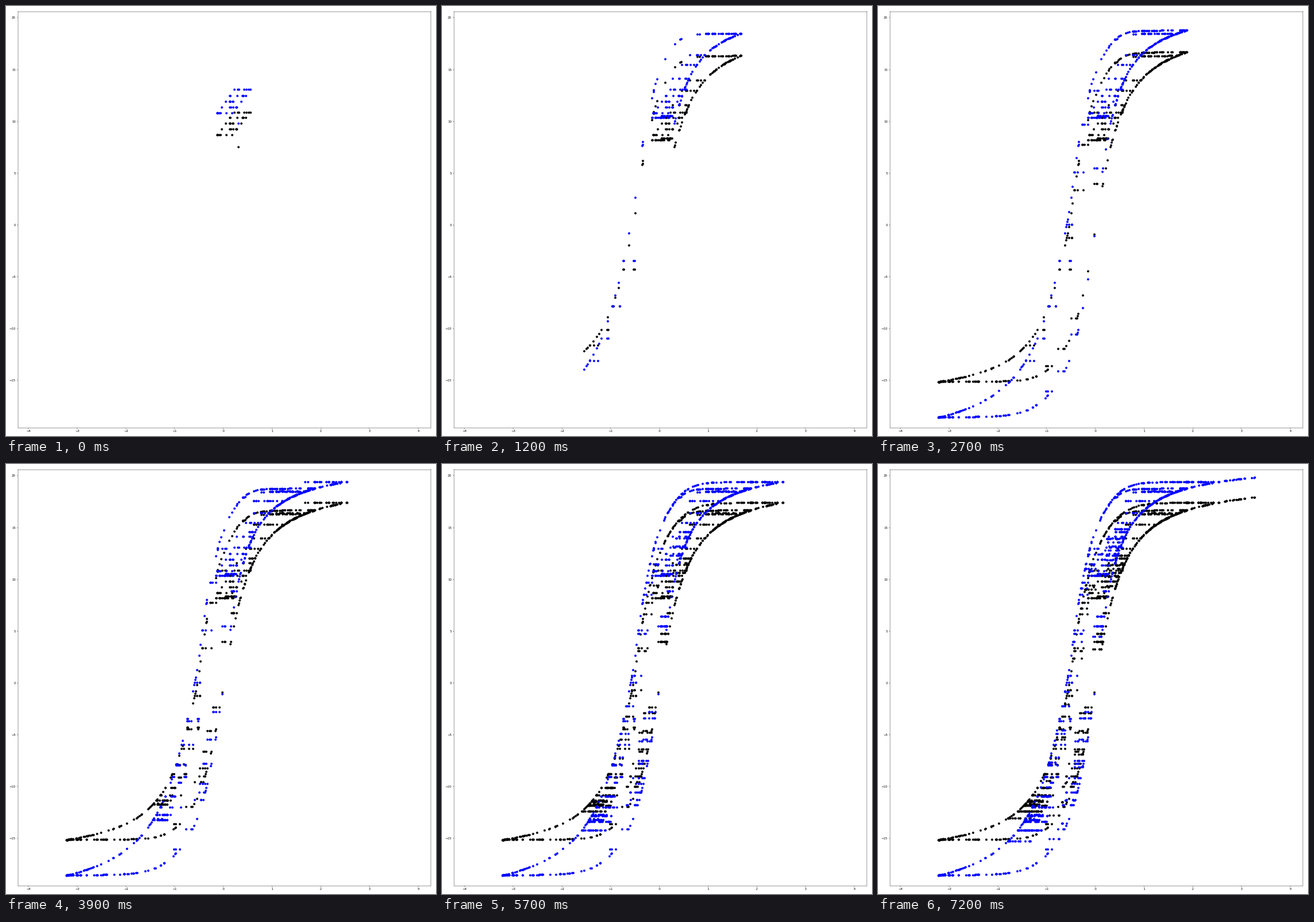
Animation, 748 px wide and 748 px high, one loop 7500 ms. Source, as a matplotlib script:

```python
import numpy as np
import matplotlib.pyplot as plt
from matplotlib.animation import FuncAnimation

FRAMES, STEP = 25, 300
SIZE = 748
rng = np.random.default_rng(7)

# Arctan branches as (x0, y0, left gain, left width, right gain, right width),
# first for the black dots, then for the blue ones.
BRANCH = {
    "up": [(0, 0, 11.8, .4, 12.5, .45), (0, 0, 13.9, .4, 13.55, .35)],
    "down": [(-.54, -.15, 10.8, .5, 13.6, .4), (-.54, 1.3, 14.7, .6, 14.2, .39)],
}
OTHER = {"up": "down", "down": "up"}
chunks = [[] for _ in range(FRAMES)]


def branch(name, x):
    """Black and blue heights on one side of the loop."""
    x = np.asarray(x, float)
    return np.array([
        y0 + np.where(x < x0, a * np.arctan((x - x0) / wa), b * np.arctan((x - x0) / wb))
        for x0, y0, a, wa, b, wb in BRANCH[name]])


def add(t, x, y):
    chunks[t].append(np.vstack([x, np.broadcast_to(y, (2, len(x)))]))


def sweep(t, name, x0, x1, n, power=1, turn=None):
    """Run along a branch, leaving the level held since the last turn."""
    u = np.r_[0, 1, rng.random(n - 2)] ** power
    x = x0 + (x1 - x0) * u
    y = branch(name, x)
    if turn is not None:
        sign = 1 if name == "up" else -1
        hold = branch(OTHER[name], turn)[:, None]
        y = sign * np.logaddexp(2 * sign * y, 2 * sign * hold) / 2
    add(t, x, y)


def terrace(t, name, x0, x1, width, rows, n):
    """Minor loops: flat rows that run inward from a branch."""
    side = -width if name == "up" else width
    for x in np.linspace(x0, x1, rows):
        xs = x + side * np.r_[0, rng.random(n - 1)]
        add(t, xs, branch(name, x)[:, None])


def ladder(t, first, last, rows, n):
    """Flat rows between two given (left, right, black, blue) rows."""
    for x0, x1, black, blue in np.linspace(first, last, rows):
        xs = np.r_[x0, x1, rng.uniform(x0, x1, n - 2)]
        add(t, xs, [[black], [blue]])


# Start and first peak
ladder(0, (.22, .55, 10.9, 13.07), (-.13, .17, 8.7, 10.8), 5, 7)
terrace(0, "up", .31, .31, 0, 1, 1)
ladder(1, (-.15, .2, 8.2, 10.38), (.05, .26, 8.4, 10.53), 2, 14)
sweep(1, "up", .32, .55, 7)
sweep(2, "up", .43, 1.46, 26)
terrace(2, "up", .6, .93, .35, 3, 6)
sweep(3, "up", 1.15, 1.67, 18)
sweep(3, "down", 1.67, .95, 28, turn=1.67)

# Fall to negative saturation
sweep(4, "down", .95, -1.55, 28, turn=1.67)
terrace(4, "down", -.74, -1.43, .25, 4, 3)
sweep(5, "down", -1.52, -3.22, 36, power=.6)
sweep(6, "up", -3.22, -1.42, 56, power=1.9, turn=-3.22)

# Rise to the second peak
sweep(7, "up", -1.4, -.03, 16, turn=-3.22)
sweep(7, "up", .14, 1.24, 18)
terrace(7, "up", -.9, -.38, .15, 3, 3)
terrace(7, "up", .15, .15, .18, 1, 4)
sweep(8, "up", 1.2, 1.88, 26)
sweep(8, "down", 1.88, 1.2, 22, turn=1.88)
sweep(9, "down", 1.2, .4, 28, turn=1.88)
sweep(9, "down", .4, -.6, 12, turn=1.88)
terrace(9, "down", -.59, -.12, .2, 4, 4)

# Minor loops at the lower left, then the third peak
terrace(10, "down", -1.2, -.75, .25, 5, 4)
terrace(11, "down", -1.45, -1.38, .3, 2, 16)
terrace(11, "down", -1.3, -1.05, .45, 2, 5)
terrace(11, "up", -.42, -.08, .2, 5, 4)
terrace(11, "up", .27, .65, .15, 2, 6)
sweep(12, "up", 1.1, 2.4, 36)
terrace(12, "up", 1.25, 1.7, .75, 2, 14)
sweep(13, "up", 2.2, 2.54, 8)
sweep(13, "down", 2.54, 1.67, 24, turn=2.54)

# Second descent with minor loops on both sides
sweep(14, "down", 2.2, .38, 46, turn=2.54)
sweep(15, "down", .4, -.3, 15, turn=2.54)
terrace(15, "down", -.2, -1.05, .2, 8, 4)
terrace(16, "down", -1.2, -1.4, .32, 2, 14)
terrace(17, "down", -1.47, -1.6, .5, 2, 22)
terrace(18, "down", -1.4, -1.3, .5, 2, 10)
terrace(18, "up", -.45, -.1, .25, 6, 6)
terrace(19, "up", .15, .18, .2, 2, 10)
terrace(19, "up", .45, .65, .25, 4, 8)
sweep(19, "up", .4, .82, 7)

# Last round and the highest peak
terrace(20, "up", .58, .68, .35, 2, 14)
sweep(20, "up", .8, 1.64, 14)
terrace(21, "up", .42, .55, .3, 3, 7)
terrace(22, "down", -.15, -.22, .4, 2, 8)
sweep(23, "down", 1.9, .4, 16, turn=2.54)
terrace(23, "down", -.3, -1.45, .2, 8, 4)
terrace(24, "down", -1.6, -1.8, .5, 2, 14)
terrace(24, "up", -.75, -.1, .2, 5, 4)
terrace(24, "up", .12, .12, .2, 1, 6)
sweep(24, "up", 2.66, 3.27, 18)

steps = [np.hstack(c) for c in chunks]
data = np.hstack(steps)
ends = np.cumsum([s.shape[1] for s in steps])

fig = plt.figure(figsize=(20, 20), dpi=SIZE / 20, facecolor="white")
ax = fig.add_axes([20.5 / SIZE, 14.5 / SIZE, 719 / SIZE, 724 / SIZE])
ax.set(xlim=(-4.223, 4.266), ylim=(-19.55, 20.61),
       xticks=range(-4, 5), yticks=range(-15, 21, 5))
dots = dict(marker="o", ls="", ms=6, mew=1.6)
black, = ax.plot([], [], color="black", **dots)
blue, = ax.plot([], [], color="blue", **dots)


def update(i):
    x, k, b = data[:, :ends[i]]
    black.set_data(x, k)
    blue.set_data(x, b)
    return black, blue


anim = FuncAnimation(fig, update, frames=FRAMES, interval=STEP,
                     init_func=lambda: update(0), repeat=True, repeat_delay=0)
plt.show()
```
